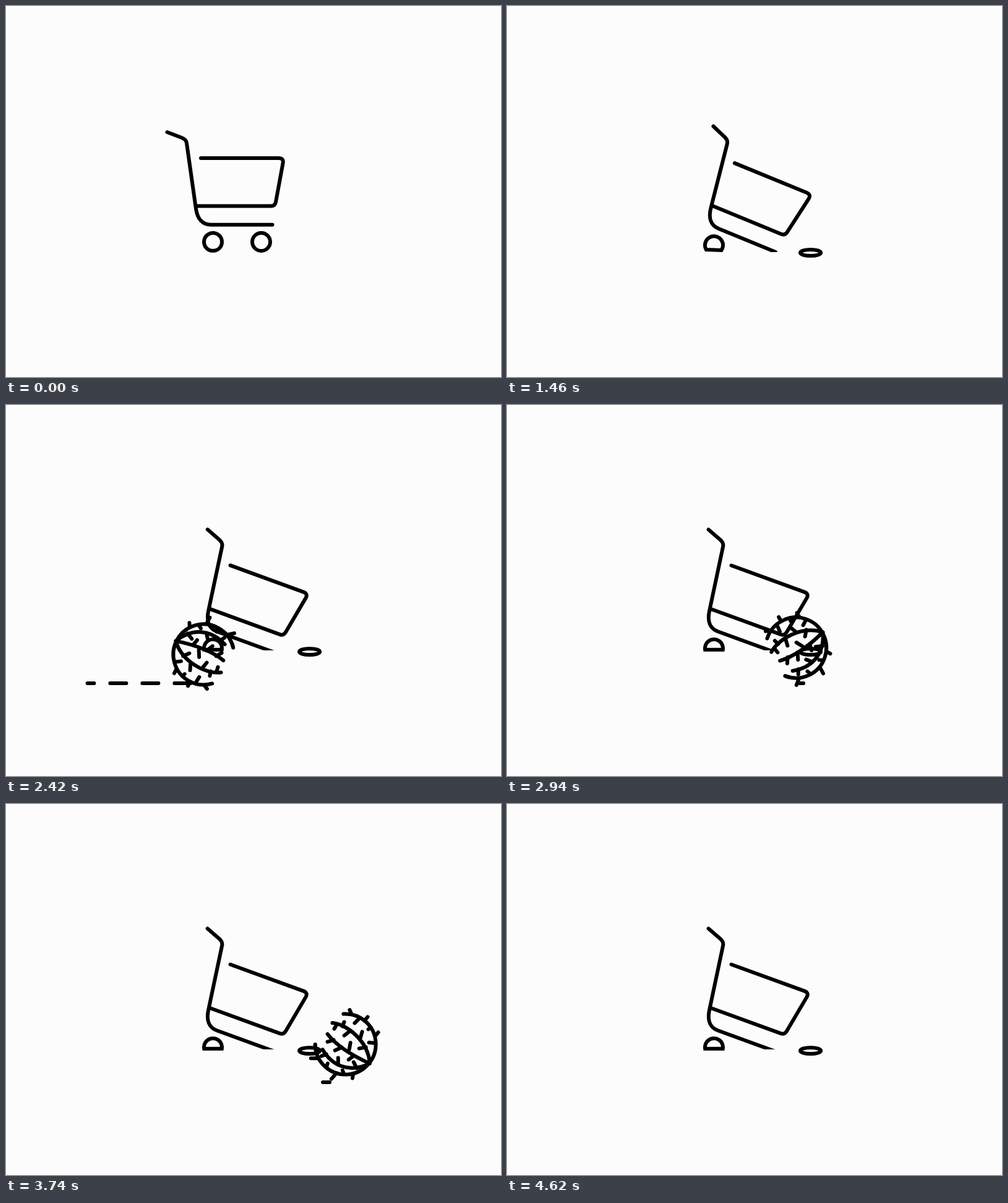
Recreate the animation shown at these times as an HTML page with a canvas. Size 800 by 600 pixels, loop 8 s.

```html
<!DOCTYPE html>
<html lang="en">
<head>
<meta charset="utf-8">
<title>Abandoned cart</title>
<style>
  html, body { margin: 0; width: 100%; height: 100%; overflow: hidden; background: #fcfcfc; }
  canvas { display: block; }
</style>
</head>
<body>
<canvas id="stage" width="800" height="600"></canvas>
<script>
const ctx = document.getElementById('stage').getContext('2d');
const LOOP = 8000;
const RAD = Math.PI / 180;
const PIVOT = { x: 334.5, y: 381.5 };

const cart = new Path2D(
  'M260.5 204L284.5 213.3Q291.2 216 292 222L307 328C309.5 345 318 353.8 331 353.8H430.5' +
  'M315 246H440.5Q449 246 447.6 254L436 317Q434.8 323.5 428.5 323.5H309');

const weed = new Path2D(
  'M-3-48.9A49 49 0 1 1-49 1.5' +
  'M-21-34.5C2-32.7 37.2-4.7 39 31.3' +
  'M-29-16.5Q-8.5 9.8 39 31.3' +
  'M-37 8.5C-22.5 33.5 4.8 47.9 39 31.3');
const thorns = new Path2D(
  'M7-55.5l3 7M36-44l-5 6M53-19l-5 6M11 55l1-6M-23 56l7-8M-49 0v6M38-2.5l9 1' +
  'M37-24l4-3M-56 22.5h11M-29 31l-2 6M-5 42l2 6M-18-25l4-7M-2-36l-3 7M15-34l6-6' +
  'M27-20l-3 10M-2-14l9-7M-29-4l10-3M-17 10l11-5M8-2.5l-2 11M22 7l11-2M5 25l8-6' +
  'M-39 19l8-3M-12 22v11M13 29l5 10');

const progress = (t, from, to) => Math.min(1, Math.max(0, (t - from) / (to - from)));
const mix = (a, b, u) => a + (b - a) * u;
const easeOut = (u, power = 2) => 1 - (1 - u) ** power;
const easeInOut = u => u < 0.5 ? 2 * u * u : 1 - 2 * (1 - u) ** 2;

// Value at time t from [time, value] pairs
function track(t, keys, ease = u => u) {
  let value = keys[0][1];
  for (let i = 1; i < keys.length; i++) {
    value = mix(value, keys[i][1], ease(progress(t, keys[i - 1][0], keys[i][0])));
  }
  return value;
}

const sinking = t => easeOut(progress(t, 1090, 2540));
const tilt = t => 24.2 * easeInOut(progress(t, 600, 1020)) - 4.2 * sinking(t);

// The fast tilt is averaged over a short shutter time
function drawCart(t) {
  const sunk = sinking(t);
  const samples = t > 590 && t < 1030 ? 16 : 1;
  ctx.save();
  ctx.beginPath();
  ctx.rect(0, 0, 800, sunk > 0 ? 399 - 2.3 * sunk : 600);
  ctx.clip();
  ctx.globalCompositeOperation = 'lighter';
  ctx.globalAlpha = 1 / samples;
  for (let i = 0; i < samples; i++) {
    const shift = samples > 1 ? mix(-10, 10, i / (samples - 1)) : 0;
    ctx.save();
    ctx.translate(PIVOT.x, PIVOT.y + 12 * sunk);
    ctx.rotate(tilt(t + shift) * RAD);
    ctx.translate(-PIVOT.x, -PIVOT.y);
    ctx.stroke(cart);
    ctx.restore();
  }
  ctx.restore();
}

function drawLeftWheel(t) {
  const sunk = sinking(t), r = 14.5;
  const cy = PIVOT.y + 12 * sunk;
  const dip = 4 * sunk * (1 - sunk);
  const chordAngle = dent => Math.asin(Math.min(1, (395.8 - dent * dip - cy) / r));
  ctx.save();
  ctx.lineJoin = 'miter';
  ctx.beginPath();
  ctx.arc(PIVOT.x, cy, r, Math.PI - chordAngle(1.7), 2 * Math.PI + chordAngle(0.8));
  ctx.closePath();
  ctx.stroke();
  ctx.restore();
}

function drawRightWheel(t) {
  const x = mix(412.5, 517, easeOut(progress(t, 500, 820)))
          - 26.4 * easeInOut(progress(t, 820, 1260));
  const fall = easeInOut(progress(t, 850, 1250));
  const rx = track(t, [[680, 14.5], [900, 11.5], [1220, 16.6]], easeInOut);
  ctx.beginPath();
  ctx.ellipse(x, mix(381.5, 399, fall), rx, mix(14.5, 5.1, fall), 0, 0, 2 * Math.PI);
  ctx.stroke();
}

const weedX = t => mix(-60, 549, easeOut(progress(t, 1646, 3810), 2.2))
                 + 320 * progress(t, 3800, 4600) ** 1.6;

function drawWeed(t) {
  const x = weedX(t);
  const y = mix(403.5, 388.5, easeOut(progress(t, 2420, 3495)))
          - 25 * Math.sin(Math.PI * progress(t, 1700, 2420))
          - 66 * Math.sin(Math.PI * progress(t, 3830, 4620));
  ctx.save();
  ctx.translate(x, y);
  ctx.rotate((x - 549) * 0.84 * RAD);
  ctx.stroke(weed);
  ctx.stroke(thorns);
  ctx.restore();
}

function drawTrail(t) {
  const head = t < 2420 ? weedX(t) - 21
    : track(t, [[2420, 298], [2940, 479], [3740, 523], [3860, 530], [4560, 840]]);
  const tail = track(t, [[2130, -10], [2420, 131], [2940, 473], [3740, 512], [3900, 518], [4560, 840]]);
  if (head <= tail) return;
  ctx.save();
  ctx.setLineDash([26, 26]);
  ctx.beginPath();
  ctx.moveTo(head, 450);
  ctx.lineTo(tail, 450);
  ctx.stroke();
  ctx.restore();
}

function draw(now) {
  const t = now % LOOP;
  ctx.clearRect(0, 0, 800, 600);
  ctx.lineWidth = 6;
  ctx.lineCap = ctx.lineJoin = 'round';
  drawCart(t);
  drawLeftWheel(t);
  drawRightWheel(t);
  if (t > 1646 && t < 4620) {
    drawTrail(t);
    drawWeed(t);
  }
  requestAnimationFrame(draw);
}
requestAnimationFrame(draw);
</script>
</body>
</html>
```
